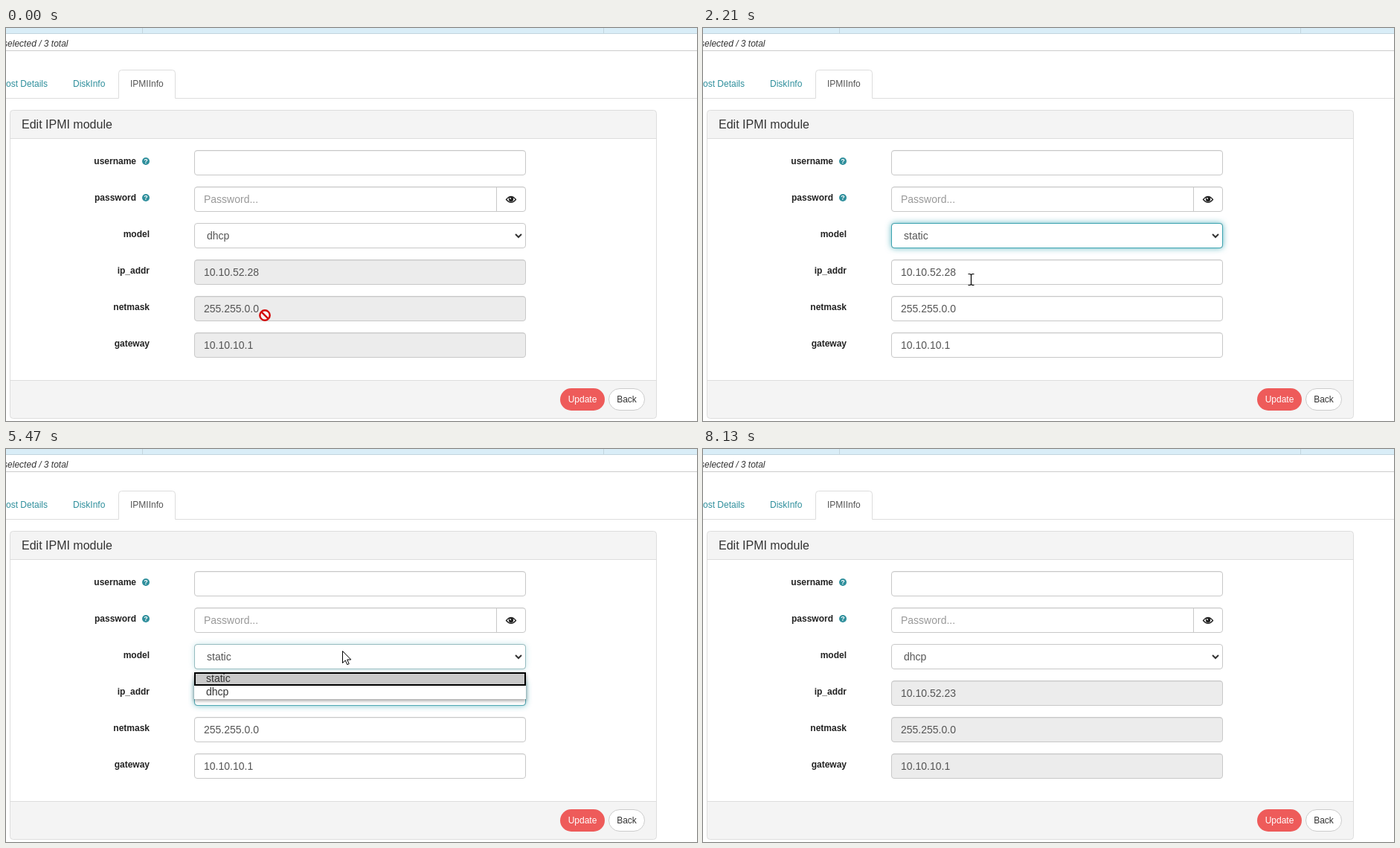
These frames come from a looping animation (929x528 px, 8850 ms). An HTML page:

```html
<!DOCTYPE html>
<html lang="en">
<head>
<meta charset="utf-8">
<title>Edit IPMI module</title>
<style>
  html, body { margin: 0; width: 100%; height: 100%; overflow: hidden; background: #fff; }
  svg { display: block; width: 929px; height: 528px; font: 12px "Liberation Sans", Arial, sans-serif; fill: #333; }
  .link { fill: #2f8f9c; }
  .label { font-weight: bold; text-anchor: end; fill: #222; }
  .value { font-size: 14px; fill: #555; }
  .item { font-size: 14px; fill: #333; }
  .hint { font: 11px "Open Sans", "Noto Sans", sans-serif; fill: #111; }
  .line { fill: none; stroke: #ddd; }
  .box { fill: #fff; stroke: #c8c8c8; }
  .off { fill: #ececec; }
  .glow { fill: #fff; filter: drop-shadow(0 0 4px rgba(35, 155, 170, .8)); }
  .ring { fill: none; stroke: #3ba3b0; }
</style>
</head>
<body>
<svg id="stage" viewBox="0 0 929 528">
  <rect width="929" height="8" fill="#d9edf7"/>
  <path d="M0 7.5H929M183.5 0V8M803.5 0V8" fill="none" stroke="#c3d5de"/>
  <path d="M0 30.5H929" fill="none" stroke="#ccc"/>
  <text x="83.5" y="25" text-anchor="end" font-style="italic">selected / 3 total</text>

  <path class="line" d="M0 94.5H151.5V60.5Q151.5 56.5 155.5 56.5H223.5Q227.5 56.5 227.5 60.5V94.5H929"/>
  <text class="link" x="56" y="79" text-anchor="end">ost Details</text>
  <text class="link" x="90" y="79">DiskInfo</text>
  <text x="167" y="79" fill="#555">IPMIInfo</text>

  <path d="M5.5 148.5V114.5Q5.5 110.5 9.5 110.5H870.5Q874.5 110.5 874.5 114.5V148.5ZM5.5 473.5H874.5V520.5Q874.5 524.5 870.5 524.5H9.5Q5.5 524.5 5.5 520.5Z" fill="#f4f4f4"/>
  <rect class="line" x="5.5" y="110.5" width="869" height="414" rx="4"/>
  <path class="line" d="M5.5 148.5H874.5M5.5 473.5H874.5"/>
  <text x="21" y="135" font-size="16">Edit IPMI module</text>

  <rect x="745" y="484" width="60" height="30" rx="15" fill="#ee5b5a"/>
  <text x="775" y="503" text-anchor="middle" fill="#fff">Update</text>
  <rect x="810.5" y="484.5" width="48" height="29" rx="14.5" fill="#fff" stroke="#ccc"/>
  <text x="834.5" y="503" text-anchor="middle">Back</text>

  <g id="form"></g>
  <path d="M659.5 214V246" stroke="#c8c8c8"/>
  <path d="M672.5 230.5Q679 222.5 685.5 230.5Q679 238 672.5 230.5Z" fill="none" stroke="#222" stroke-width="1.3"/>
  <circle cx="679" cy="230" r="3.2" fill="#222"/>
  <circle cx="678" cy="229" r=".9" fill="#fff"/>
  <path d="M685 277L689 281L693 277" fill="none" stroke="#333" stroke-width="2"/>
  <g id="pick">
    <rect x="333" y="320" width="8" height="16" fill="#0078d7"/>
    <text class="value" x="332.6" y="333" style="fill:#fff">8</text>
  </g>

  <g id="hints">
    <rect x="247" y="348" width="412" height="90" rx="15" fill="#000" opacity=".085"/>
    <path d="M253 345H653V417Q653 421 649 421H257Q253 421 253 417Z" fill="#fff" style="filter:drop-shadow(0 2px 3px rgba(0,0,0,.35))"/>
    <g id="hover">
      <rect x="257.5" y="349.5" width="357" height="33" rx="2" fill="#e3edfa" stroke="#5f9bd0"/>
      <path d="M625 361.5H638M629 361V358.5H634V361M626.5 362V373.5H636.5V362M629.5 364V371M631.5 364V371M633.5 364V371" fill="none" stroke="#444"/>
    </g>
    <text class="hint" x="266" y="370.5" stroke="#111" stroke-width=".25">10.10.52.28</text>
    <text class="hint" x="266" y="404.5">10.10.52.21</text>
  </g>

  <g id="menu">
    <rect x="253" y="300" width="446" height="36" fill="#fff" style="filter:drop-shadow(0 2px 2.5px rgba(0,0,0,.4))"/>
    <rect id="mark" x="254" width="444" height="16" fill="#c9c9c9" stroke="#000" stroke-width="2"/>
    <text class="item" x="269" y="313">static</text>
    <text class="item" x="269" y="331">dhcp</text>
  </g>

  <g id="arrow">
    <path d="M.5 .5V16.5L4.2 13L6.8 18.7L9.2 17.6L6.7 12H11.8Z" fill="#fff" stroke="#000"/>
  </g>
  <g id="beam">
    <path d="M-3.5 -7.5H-1L.5 -6.5L2 -7.5H4.5M.5 -6.5V6.5M-3.5 7.5H-1L.5 6.5L2 7.5H4.5" fill="none" stroke="#000" stroke-width="1.2"/>
  </g>
  <g id="ban">
    <circle r="6.7" fill="#fff" fill-opacity=".7" stroke="#d40808" stroke-width="2.4"/>
    <path d="M-4.7 -4.7L4.7 4.7" stroke="#d40808" stroke-width="2.4"/>
  </g>
</svg>
<script>
const LOOP = 8850;
const $ = id => document.getElementById(id);

function add(tag, attrs, text = '') {
  const el = document.createElementNS('http://www.w3.org/2000/svg', tag);
  for (const key in attrs) el.setAttribute(key, attrs[key]);
  el.textContent = text;
  $('form').append(el);
  return el;
}

function addField(name, i, value) {
  const y = 164 + 49 * i;
  const frame = { x: 253.5, y: y + .5, width: 445, height: 33, rx: 3.5 };
  const hasHelp = i < 2;
  add('text', { class: 'label', x: hasHelp ? 175 : 193, y: y + 19 }, name);
  if (hasHelp) {
    add('circle', { cx: 188, cy: y + 15, r: 5, fill: '#2f8f9c' });
    add('text', { x: 188, y: y + 18.2, 'text-anchor': 'middle', 'font-size': 9, 'font-weight': 'bold', style: 'fill:#fff' }, '?');
  }
  const glow = add('rect', { ...frame, class: 'glow' });
  const box = add('rect', { ...frame, class: 'box' });
  if (i !== 2) add('path', { d: `M255 ${y + 1.5}H697`, stroke: '#000', opacity: .05 });
  const ring = add('rect', { ...frame, class: 'ring' });
  const text = add('text', { class: 'value', x: i === 2 ? 270 : 266, y: y + 22 }, value);
  return {
    box, text,
    focus(level) { glow.style.opacity = ring.style.opacity = level; }
  };
}

const fields = [
  ['username', ''], ['password', 'Password...'], ['model', 'dhcp'],
  ['ip_addr', '10.10.52.28'], ['netmask', '255.255.0.0'], ['gateway', '10.10.10.1']
].map(([name, value], i) => addField(name, i, value));
const [user, password, model, ip, netmask, gateway] = fields;
password.text.style.fill = '#999';
fields.forEach(f => f.focus(0));

// Pointer: first time, last time, steps, shape, start x y, end x y
const moves = [
  [0, 0, 1, 'ban', 348, 386],
  [130, 250, 2, 'ban', 356, 406, 364, 426],
  [530, 530, 1, 'ban', 372, 333],
  [810, 950, 2, 'ban', 405, 326, 440, 317],
  [1080, 1220, 2, 'arrow', 480, 298, 515, 290],
  [1360, 1360, 1, 'arrow', 536, 288],
  [1660, 1780, 2, 'arrow', 536, 296, 534, 306],
  [2210, 2500, 3, 'beam', 360, 338, 342, 328],
  [2660, 3130, 4, 'beam', 341, 328, 333, 328],
  [3270, 3390, 2, 'beam', 341, 331, 356, 338],
  [3510, 3630, 2, 'arrow', 368, 348, 375, 353],
  [5080, 5080, 1, 'beam', 388, 336],
  [5200, 5470, 3, 'arrow', 412, 302, 452, 271],
  [5990, 6260, 3, 'arrow', 449, 286, 440, 324],
  [6720, 7140, 4, 'ban', 415, 327, 348, 321],
  [7290, 7710, 4, 'ban', 347, 324, 332, 336],
  [7860, 8000, 2, 'arrow', 220, 346, 70, 338],
  [8130, 8130, 1, 'none', 0, 0]
];

const states = [
  [0, { model: 'dhcp', ip: '10.10.52.28', off: true, menu: '', hints: 0, pick: false, modelFocus: 0, ipFocus: 0 }],
  [1360, { menu: 'dhcp', modelFocus: .4 }],
  [1510, { modelFocus: 1 }],
  [1780, { menu: 'static' }],
  [2210, { menu: '', model: 'static', off: false }],
  [2500, { modelFocus: .4, ipFocus: .6 }],
  [2660, { modelFocus: 0, ipFocus: 1 }],
  [2970, { pick: true }],
  [4030, { pick: false, ip: '10.10.52.2', hints: 1 }],
  [4180, { ip: '10.10.52.28', hints: 2 }],
  [4710, { ip: '10.10.52.23', hints: 0 }],
  [5470, { menu: 'static', modelFocus: .35, ipFocus: .85 }],
  [5590, { modelFocus: 1, ipFocus: 0 }],
  [6260, { menu: 'dhcp' }],
  [6720, { menu: '', model: 'dhcp', off: true }],
  [7860, { modelFocus: 0 }]
];

const show = (id, on) => { $(id).style.display = on ? '' : 'none'; };

function drawPointer(t) {
  const [from, to, steps, shape, x0, y0, x1 = x0, y1 = y0] = moves.findLast(m => m[0] <= t);
  const last = steps - 1;
  const k = last ? Math.min(last, Math.floor((t - from) / (to - from) * last + 1e-6)) / last : 0;
  const x = Math.round(x0 + (x1 - x0) * k);
  const y = Math.round(y0 + (y1 - y0) * k);
  for (const id of ['arrow', 'beam', 'ban']) {
    show(id, id === shape);
    $(id).setAttribute('transform', `translate(${x} ${y})`);
  }
}

function drawForm(t) {
  const s = {};
  for (const [at, change] of states) if (at <= t) Object.assign(s, change);
  const preview = s.hints === 2;
  model.text.textContent = s.model;
  ip.text.textContent = s.ip;
  ip.text.style.fontSize = preview ? '13.333px' : '';
  ip.text.style.fill = preview ? '#000' : '';
  ip.box.style.fill = preview ? '#e8f0fe' : '';
  for (const f of [ip, netmask, gateway]) f.box.classList.toggle('off', s.off);
  model.focus(s.modelFocus);
  ip.focus(s.ipFocus);
  show('pick', s.pick);
  show('hints', s.hints > 0);
  show('hover', preview);
  show('menu', s.menu);
  $('mark').setAttribute('y', s.menu === 'static' ? 301 : 319);
}

const start = performance.now();
function tick() {
  const t = (performance.now() - start) % LOOP;
  drawForm(t);
  drawPointer(t);
  requestAnimationFrame(tick);
}
tick();
</script>
</body>
</html>
```
